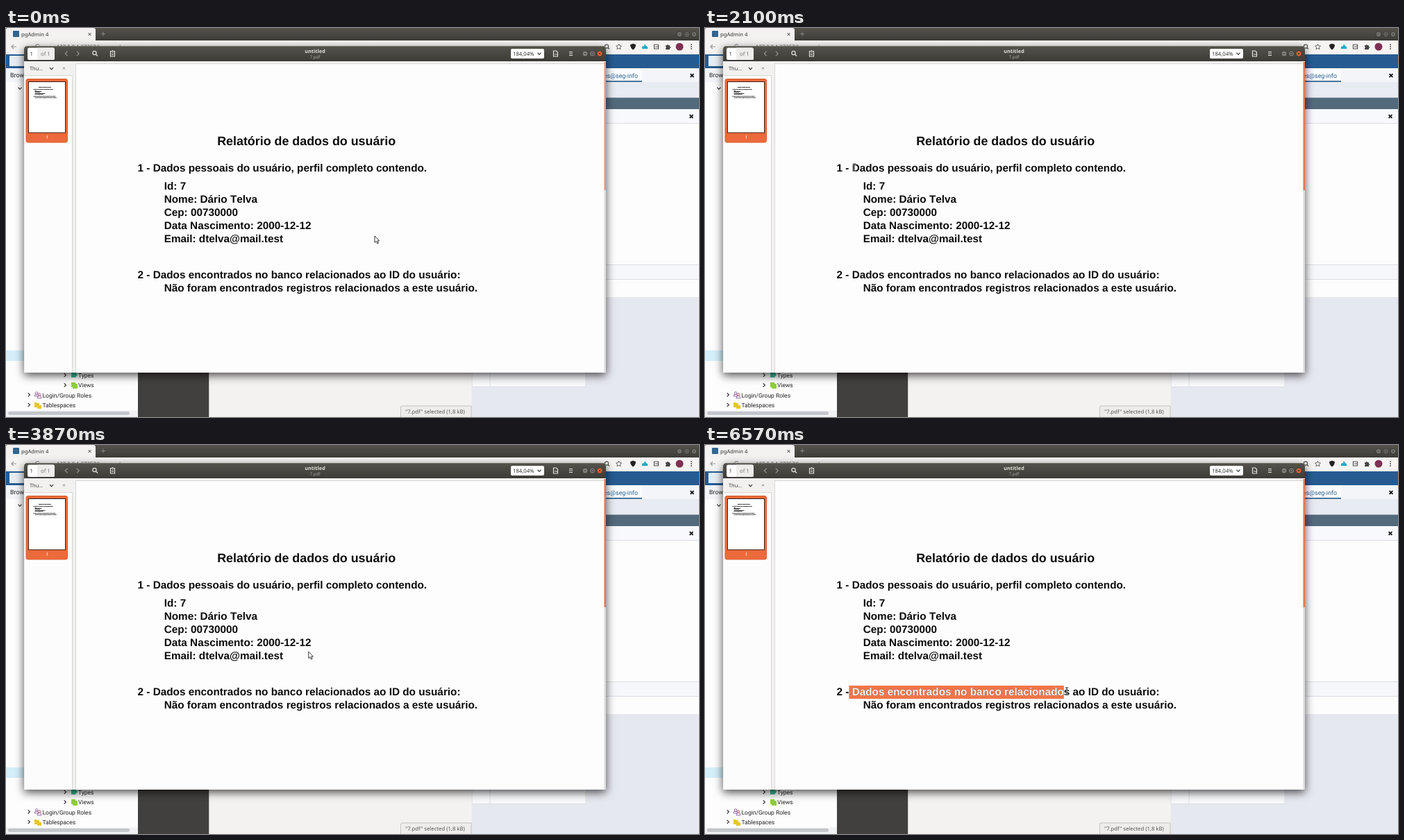
Animation, 998 px wide and 561 px high, one loop 6640 ms. Source, as an HTML page:

```html
<!DOCTYPE html>
<html lang="pt-BR">
<head>
<meta charset="utf-8">
<title>Relatório</title>
<style>
html, body { margin: 0; width: 100%; height: 100%; overflow: hidden; background: #fff }
svg { display: block; width: 100%; height: 100%; text-rendering: geometricPrecision }
text { white-space: pre }
.ui { font: 7.7px "Noto Sans", "Open Sans", sans-serif }
.tree { font: 8.5px Roboto, sans-serif; fill: #222 }
#rows { font: bold 15.31px "Liberation Sans", Arial, sans-serif; font-kerning: none; font-variant-ligatures: none }
.line { fill: none; stroke: #333; stroke-width: 1.2 }
.light { stroke: #e4e2dc }
.bold { stroke: #111; stroke-width: 1.8 }
</style>
</head>
<body>
<svg viewBox="0 0 998 561">
  <defs>
    <linearGradient id="bar" x2="0" y2="1"><stop stop-color="#55534c"/><stop offset="1" stop-color="#3c3b37"/></linearGradient>
    <filter id="shadow" x="-10%" y="-10%" width="120%" height="125%">
      <feDropShadow dx="0" dy="4" stdDeviation="6.5" flood-opacity=".7"/>
    </filter>
    <clipPath id="clip"><path class="sel"/></clipPath>
    <path id="down" d="M-2.5-1.3 0 1.3 2.5-1.3"/>
    <path id="right" d="M-1.3-2.7 1.4 0-1.3 2.7"/>
    <path id="cross" d="M-2.4-2.4 2.4 2.4M2.4-2.4-2.4 2.4"/>
  </defs>

  <!-- browser -->
  <rect width="998" height="561" fill="#fdfdfd"/>
  <rect width="998" height="18" fill="url(#bar)"/>
  <path d="M0 18V2q0-2 2-2H126q3 0 3 3V18Z" fill="#f3f2f1"/>
  <rect x="10" y="4" width="9" height="9" rx="1" fill="#326690"/>
  <text class="ui" x="22" y="11.7" fill="#333">pgAdmin 4</text>
  <use href="#cross" class="line" transform="translate(120.5 9) scale(.8)"/>
  <path class="line" stroke-opacity=".6" style="stroke:#aaa" d="M137 8.5h6M140 5.5v6"/>
  <g fill="#77756f" stroke="#33322e" stroke-width=".7">
    <circle cx="970" cy="9" r="3.7"/><circle cx="980.5" cy="9" r="3.7"/><circle cx="991" cy="9" r="3.7"/>
  </g>
  <path d="M968.5 9h3M979 7.5h3v3h-3zM989.5 7.5l3 3m0-3-3 3" class="line" style="stroke-width:.7"/>
  <rect y="18" width="998" height="20" fill="#f5f4f2"/>
  <path class="line" style="stroke:#999" d="M15 27H8m3-3-3 3 3 3M48 25a3.2 3.2 0 1 0 .4 3"/>
  <text class="ui" x="73" y="30" fill="#555">127.0.0.1:37357/browser/</text>
  <g class="line" style="stroke:#555">
    <circle cx="865" cy="26.5" r="2.6"/><path d="m867 28.5 2 2"/>
    <path stroke-width=".9" d="m882.5 23 1.2 2.7 2.8.3-2.1 1.9.6 2.8-2.5-1.4-2.5 1.4.6-2.8-2.1-1.9 2.8-.3Z"/>
    <path d="M933.5 24h6v6h-6zM935 27h5"/>
  </g>
  <path d="M899 24l4-1.5 4 1.5q0 5-4 7.5-4-2.5-4-7.5" fill="#222"/>
  <path d="M916 30q-1-4 3-4l1-3 2 3q3 1 2 4Z" fill="#22a9c4"/>
  <path d="M950 25h2q1-3 2 0h2v2q3 1 0 2v2h-6v-2q2-1 0-2Z" fill="#444"/>
  <circle cx="970" cy="27" r="5.5" fill="#7d3152"/>
  <g fill="#444"><circle cx="987" cy="24" r=".9"/><circle cx="987" cy="27" r=".9"/><circle cx="987" cy="30" r=".9"/></g>

  <!-- database page -->
  <rect y="38" width="998" height="20" fill="#265b91"/>
  <rect x="5" y="40" width="21" height="15" fill="#e6edf3"/>
  <rect y="58" width="998" height="20" fill="#f3f5f9"/>
  <text class="tree" x="6" y="71" style="font-size:8.8px">Browser</text>
  <use href="#down" class="line" x="20" y="87"/>
  <rect y="465" width="190" height="15" fill="#d4effa"/>
  <g class="line">
    <use href="#right" x="85" y="500.5"/><use href="#right" x="85" y="515"/>
    <use href="#right" x="33" y="529"/><use href="#right" x="33" y="543.5"/>
  </g>
  <path d="M94 496h6l3 4-3 4h-6Z" fill="#39b995"/>
  <path d="M94 511h6v2h3v7h-7v-2h-2Z" fill="#8fce3c"/>
  <g fill="#f5e6e4" stroke="#8d6fa8" stroke-width=".9">
    <path d="M41 531q0-3 3-3t3 3ZM45 534q0-4 3-4t3 4Z"/><circle cx="44" cy="526.5" r="1.8"/><circle cx="48" cy="528.5" r="1.8" stroke="#c5576b"/>
  </g>
  <path d="M41 540h3l1 1h3v3h3v5h-6v-2h-4Z" fill="#e6c72c"/>
  <g class="tree">
    <text x="104" y="504">Types</text><text x="104" y="518.3">Views</text>
    <text x="52.5" y="532.5">Login/Group Roles</text><text x="52.5" y="547">Tablespaces</text>
  </g>
  <rect y="551.5" width="190" height="10" fill="#f0f1f3"/>
  <rect x="3" y="553" width="175" height="5" rx="2.5" fill="#c3c6ca"/>

  <g transform="translate(850)">
    <rect y="58" width="66" height="20" fill="#fbfcfe"/>
    <rect y="76" width="66" height="1.8" fill="#326690"/>
    <rect y="78" width="148" height="23" fill="#e8ebf1"/>
    <rect y="100.5" width="148" height="16.5" fill="#536a7c"/>
    <rect y="117" width="148" height="20" fill="#f8f9fc"/>
    <path d="M0 137.5H148M0 341.5H148M0 362.5H148" stroke="#d9dde4"/>
    <rect y="342" width="148" height="20" fill="#f6f7fa"/>
  </g>
  <text class="tree" x="910" y="71.5" text-anchor="end" style="font-size:8.9px;fill:#2c6293">postgres@seg-info</text>
  <use href="#cross" class="line bold" x="988" y="68.5"/>
  <use href="#cross" class="line bold" x="987" y="127.5"/>
  <rect x="670" y="388" width="328" height="173" fill="#e6e8ef"/>
  <rect x="672" y="480" width="163" height="37.5" fill="#f8f9fb"/>
  <path d="M672 517.5H835V497M697 497v20" fill="none" stroke="#dcdfe6"/>

  <!-- file manager -->
  <rect x="190" y="480" width="102.5" height="81" fill="#42403e"/>
  <rect x="292.5" y="480" width="378" height="81" fill="#f4f2f0"/>
  <path d="M568.5 561V547q0-2 2-2H670V561" fill="#efedeb" stroke="#c4c1bd"/>
  <text class="ui" x="575" y="556" fill="#555">"7.pdf" selected (1,8 kB)</text>

  <!-- document viewer -->
  <path filter="url(#shadow)" d="M26 497V31q0-5 5-5H859q5 0 5 5V497Z" fill="#f2f1f0"/>
  <path d="M26 48V31q0-5 5-5H859q5 0 5 5V48Z" fill="url(#bar)"/>
  <path d="M29 26.5H861" stroke="#716f67" stroke-width=".8"/>
  <rect x="31" y="28.5" width="39" height="17.5" rx="2.5" fill="#fff"/>
  <path d="M45 28.5h22.5q2.5 0 2.5 2.5v12.5q0 2.5-2.5 2.5H45Z" fill="#eeedeb"/>
  <g class="ui" fill="#333">
    <text x="34.5" y="40">1</text><text x="50" y="40" fill="#777">of 1</text>
    <text x="445" y="36" text-anchor="middle" fill="#e6e3dc" style="font-weight:bold;font-size:7.2px;letter-spacing:.1px">untitled</text>
    <text x="445" y="43.5" text-anchor="middle" fill="#a9a69e" style="font-size:6.2px">7.pdf</text>
  </g>
  <use href="#right" class="line" style="stroke:#8b8982" transform="translate(87 37) scale(-1.2 1.2)"/>
  <use href="#right" class="line" style="stroke:#8b8982" transform="translate(103.5 37) scale(1.2)"/>
  <g class="line light">
    <circle cx="127.5" cy="36" r="2.6"/><path d="m129.5 38 2.5 2.5"/>
    <path d="M150.5 33.5h6v7.5h-6zM152 36h3M152 38.5h3M153.5 32v2"/>
    <path d="M788.5 33h4l2 2v6h-6zM790 38h4M811 34.5h5M811 37h5M811 39.5h5"/>
  </g>
  <rect x="727" y="30" width="48" height="14" rx="2" fill="#fff"/>
  <text class="ui" x="730" y="39.8" fill="#333">184,04%</text>
  <use href="#down" class="line" x="768" y="37"/>
  <g stroke="#33322e" stroke-width=".7">
    <circle cx="834" cy="37" r="4" fill="#85837c"/><circle cx="844.5" cy="37" r="4" fill="#85837c"/><circle cx="855" cy="37" r="4" fill="#ea6236"/>
  </g>
  <path d="M832 37h4M843 35.5h3v3h-3zM853.5 35.5l3 3m0-3-3 3" class="line" style="stroke-width:.8"/>

  <rect x="27" y="68" width="68" height="429" fill="#fcfcfc"/>
  <path d="M27 68.5H95.5V497M100.5 497V51.5H861" fill="none" stroke="#d9d7d4"/>
  <text class="ui" x="34" y="61" fill="#444" style="font-size:7.4px">Thu…</text>
  <use href="#down" class="line" x="65.5" y="58.5"/>
  <use href="#cross" class="line" style="stroke:#666" transform="translate(83.5 58) scale(.6)"/>
  <rect x="29" y="73.5" width="59.5" height="91.5" rx="2.5" fill="#ec6a3b" stroke="#d85d31"/>
  <rect x="32.5" y="77.5" width="53" height="73.5" fill="#fff" stroke="#3a2018"/>
  <use href="#rows" stroke="#000" stroke-width="3" transform="translate(33 78) scale(.069) translate(-100 -51)"/>
  <text class="ui" x="59" y="159.5" text-anchor="middle" fill="#fff" style="font-style:italic;font-size:6.8px">1</text>

  <rect x="101" y="52" width="760.5" height="445" fill="#fdfdfd"/>
  <rect x="861.5" y="49" width="2.5" height="448" fill="#dcdcde"/>
  <rect id="scroll" x="861.5" y="49" width="2.5" height="185" fill="#ec6c45"/>
  <path class="sel" fill="#f0754a"/>
  <g fill="#0c0c0c"><g id="rows"></g></g>
  <use href="#rows" fill="#fff" clip-path="url(#clip)"/>

  <g id="cursor" stroke-linejoin="round">
    <path id="arrow" d="M0 0V9.5L2.2 7.5 3.8 11 5.4 10.3 3.9 7H6.7Z" fill="#fff" stroke="#222" stroke-width=".9"/>
    <g id="beam" fill="none">
      <path d="M-2.2-5H2.2M0-5V5M-2.2 5H2.2" stroke="#fff" stroke-width="2.4" opacity=".7"/>
      <path d="M-2.2-5H2.2M0-5V5M-2.2 5H2.2" stroke="#222" stroke-width="1.1"/>
    </g>
  </g>
</svg>
<script>
const $ = id => document.getElementById(id);
const LOOP = 6640, LAG = 100;

const rows = [
  [304.2, 169, 'Relatório de dados do usuário', 17.86],
  [189.6, 207.4, '1 - Dados pessoais do usuário, perfil completo contendo.'],
  [227.7, 232.8, 'Id: 7'],
  [227.7, 252, 'Nome: Dário Telva'],
  [227.7, 271.1, 'Cep: 00730000'],
  [227.7, 290.2, 'Data Nascimento: 2000-12-12'],
  [227.7, 309.3, 'Email: dtelva@mail.test'],
  [189.6, 360.6, '2 - Dados encontrados no banco relacionados ao ID do usuário:'],
  [227.7, 379.6, 'Não foram encontrados registros relacionados a este usuário.']
].map(([x, y, label, size]) => {
  const el = document.createElementNS('http://www.w3.org/2000/svg', 'text');
  el.setAttribute('x', x);
  el.setAttribute('y', y);
  if (size) el.style.fontSize = size + 'px';
  el.textContent = label;
  $('rows').append(el);
  return { el, x, top: y - 13.6, count: label.length };
});

// time, x, y of the pointer
const path = [
  [0, 531, 300], [300, 518, 290], [700, 430, 259], [1130, 354, 255], [1330, 272, 248],
  [1700, 230, 214], [2030, 215, 201], [2300, 215, 201], [2630, 410, 288], [2730, 454, 306],
  [2930, 466, 309], [3400, 455, 307], [3870, 436, 298], [4330, 300, 352], [4730, 213, 360],
  [5100, 212, 359], [5630, 360, 352], [5730, 391, 351], [6430, 515, 354], [6570, 521, 355],
  [LOOP, 521, 355]
];
// start, end, row and first character of each drag
const drags = [[2300, 3400, 1, 4], [5100, LOOP, 7, 3]];
// when the pointer is a text beam
const beams = [[950, 2950], [4450, LOOP]];

function pointer(t) {
  const i = Math.max(1, path.findIndex(p => p[0] >= t));
  const [a, b] = [path[i - 1], path[i]];
  const k = (t - a[0]) / (b[0] - a[0]);
  return [a[1] + (b[1] - a[1]) * k, a[2] + (b[2] - a[2]) * k];
}

const edge = (row, n) => n ? row.el.getEndPositionOfChar(n - 1).x : row.x;

function nearestEdge(row, x) {
  let n = 0;
  while (n < row.count && (edge(row, n) + edge(row, n + 1)) / 2 < x) n++;
  return edge(row, n);
}

function selection(t) {
  const drag = drags.find(([from, to]) => t >= from + LAG && t < to);
  if (!drag) return '';
  const [, , first, char] = drag, [x, y] = pointer(t - LAG);
  let last = first, d = '';
  while (last + 1 < rows.length && rows[last + 1].top <= y) last++;
  for (let i = first; i <= last; i++) {
    const row = rows[i];
    const left = edge(row, i === first ? char : 0);
    const right = i === last ? nearestEdge(row, x) : edge(row, row.count);
    if (right > left) d += `M${left} ${row.top}H${right}v19.1H${left}Z`;
  }
  return d;
}

function draw(now) {
  const t = now % LOOP;
  const d = selection(t);
  document.querySelectorAll('.sel').forEach(el => el.setAttribute('d', d));
  const beam = beams.some(([from, to]) => t >= from && t < to);
  $('beam').style.display = beam ? '' : 'none';
  $('arrow').style.display = beam ? 'none' : '';
  $('cursor').setAttribute('transform', `translate(${pointer(t)})`);
  $('scroll').setAttribute('opacity', .6 + .3 * Math.min(1, Math.max(0, (t - 700) / 300)));
  requestAnimationFrame(draw);
}
requestAnimationFrame(draw);
</script>
</body>
</html>
```
